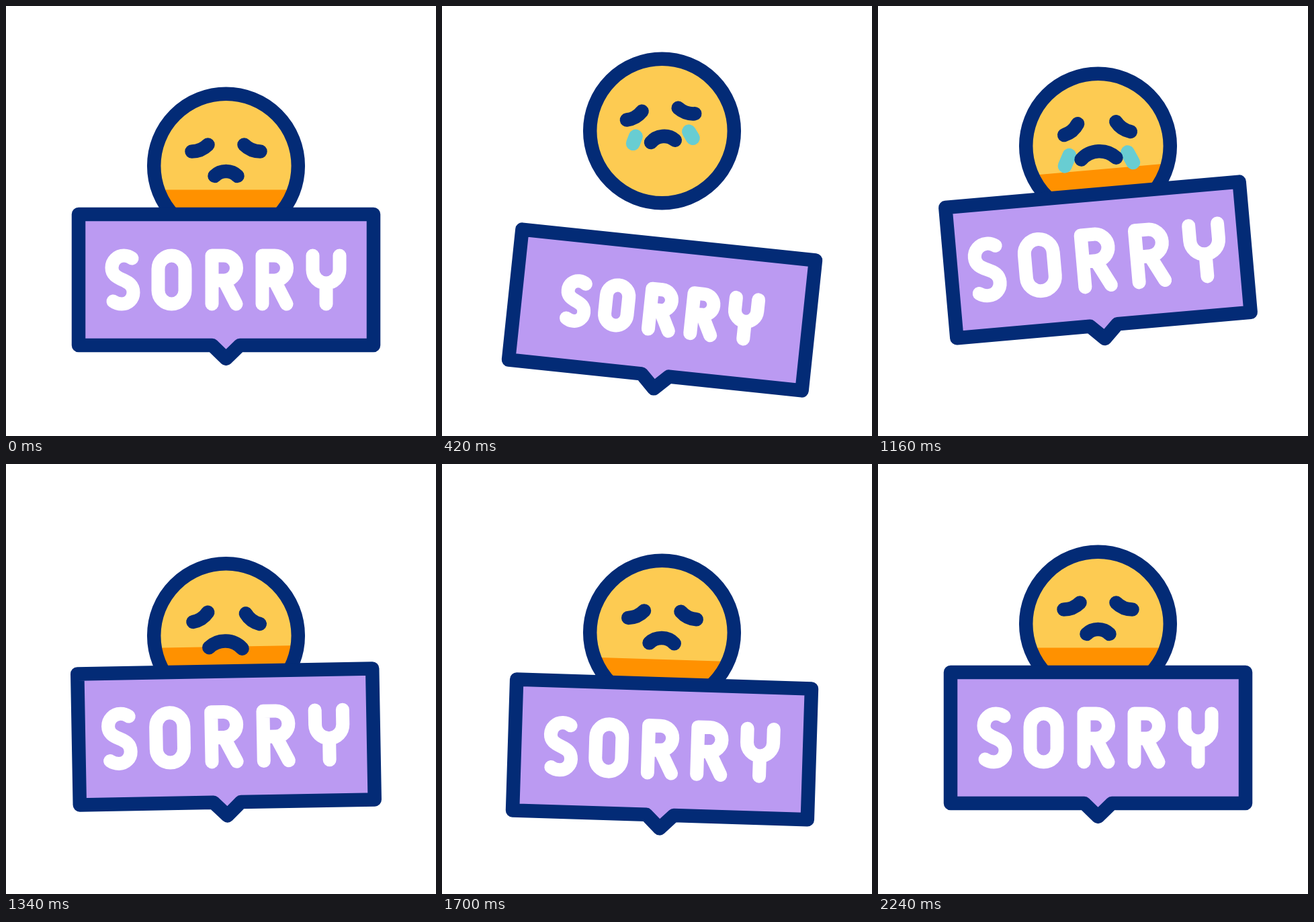
Animation of 640x640 px, one loop 2300 ms. Source, as an HTML page with a canvas:

```html
<!DOCTYPE html>
<html lang="en">
<head>
<meta charset="utf-8">
<title>Sorry</title>
<style>
  html, body { margin: 0; width: 100%; height: 100%; overflow: hidden; background: #fff; }
  canvas { display: block; }
</style>
</head>
<body>
<canvas width="640" height="640"></canvas>
<script>
const ctx = document.querySelector('canvas').getContext('2d');
const LOOP = 2300, CX = 327.5, FACE_Y = 238, BOARD_Y = 407.5, LINE = 20.5;
const NAVY = '#032b76', YELLOW = '#fdcb52', ORANGE = '#ff9100',
      PURPLE = '#bb9af2', TEAR = '#68cdd2';

const board = new Path2D('M-219.5-97.5H219.5V97.5H20.5L0 117.5L-20.5 97.5H-219.5Z');
const letterR = 'v-72h18a18.5 18.5 0 0 1 0 37h-18m18 0l18 35';
const letters = new Path2D(
  'M-140-32C-144-35-148-36-152-36C-162-36-170-28-170-18C-170-8-163-4-154 0' +
  'C-145 4-138 8-138 19C-138 29-146 36-155 36C-160 36-164 35-168 32' +
  'M-101-16a20 20 0 0 1 40 0v32a20 20 0 0 1-40 0z' +
  'M-21 36' + letterR + 'M54 36' + letterR +
  'M129-36v21a20 20 0 0 0 40 0v-21M149 5v31');
const brow = new Path2D('M-12 5Q2 5 12-5');

const smooth = x => (x = Math.min(1, Math.max(0, x)), x * x * (3 - 2 * x));

// Eases from 0 at the start time through [time, value] points
function through(t, start, ...points) {
  let time = start, value = 0;
  for (const [nextTime, nextValue] of points) {
    if (t < nextTime) return value + (nextValue - value) * smooth((t - time) / (nextTime - time));
    [time, value] = [nextTime, nextValue];
  }
  return value;
}

// The board drops open, creeps, then snaps up, rebounds and settles
const swing = (t, open, creep, snap, rebound, settle = 0) =>
  through(t, 0, [420, open], [960, creep], [1210, snap], [1470, rebound], [1940, settle], [2200, 0]);

function group(x, y, deg, draw) {
  ctx.save();
  ctx.translate(x, y);
  ctx.rotate(deg * Math.PI / 180);
  draw();
  ctx.restore();
}

function stroke(path, color, width = LINE) {
  ctx.strokeStyle = color;
  ctx.lineWidth = width;
  ctx.stroke(path);
}

function drawTears(t) {
  const p = (t - 345) % 690 / 280;
  if (p <= 0 || p >= 1) return;
  const head = smooth(p / .78), tail = smooth((p - .22) / .78);
  for (const side of [-1, 1]) {
    const line = new Path2D();
    for (const u of [tail, head]) line.lineTo(side * (39.5 + 18.5 * u), 4 + 38 * u);
    stroke(line, TEAR, 21);
  }
}

function drawFeatures(t) {
  const sad = through(t, 230, [1160, 1], [1900, 0]);
  drawTears(t);
  for (const side of [-1, 1]) {
    ctx.save();
    ctx.scale(-side, 1);
    group(-39, -26.5, -14.5 * sad, () => stroke(brow, NAVY));
    ctx.restore();
  }
  const endX = 17 + 9 * sad, endY = 15 + 4 * sad;
  const bendX = 8 + 4 * sad, bendY = 5.7 - 1.3 * sad;
  const mouth = new Path2D();
  mouth.moveTo(-endX, endY);
  mouth.bezierCurveTo(-bendX, bendY, bendX, bendY, endX, endY);
  stroke(mouth, NAVY);
}

function draw(t) {
  const lift = through(t, 0, [420, -52], [980, -60], [1440, 28], [1940, 0]);
  const faceY = FACE_Y + lift;
  const boardY = BOARD_Y + swing(t, 45, 46, -38, 34);
  const angle = swing(t, 6, 6.5, -6.3, 4.1, -.6);
  const textSize = 1 + swing(t, -.164, -.2, .105, -.043);

  ctx.fillStyle = '#fff';
  ctx.fillRect(0, 0, 640, 640);
  ctx.lineCap = ctx.lineJoin = 'round';

  const face = new Path2D();
  face.arc(CX, faceY, 107.3, 0, 2 * Math.PI);
  ctx.fillStyle = YELLOW;
  ctx.fill(face);

  // Shade cast by the board onto the face
  ctx.save();
  ctx.clip(face);
  group(CX, boardY, angle, () => {
    ctx.fillStyle = ORANGE;
    ctx.fillRect(-230, -134, 460, 230);
  });
  ctx.restore();
  stroke(face, NAVY);
  group(CX, faceY, lift / 10, () => drawFeatures(t));

  group(CX, boardY, angle, () => {
    ctx.fillStyle = PURPLE;
    ctx.fill(board);
    stroke(board, NAVY);
    ctx.scale(textSize, textSize);
    stroke(letters, '#fff', 20 / textSize);
  });
}

function tick() {
  draw(performance.now() % LOOP);
  requestAnimationFrame(tick);
}
tick();
</script>
</body>
</html>
```
